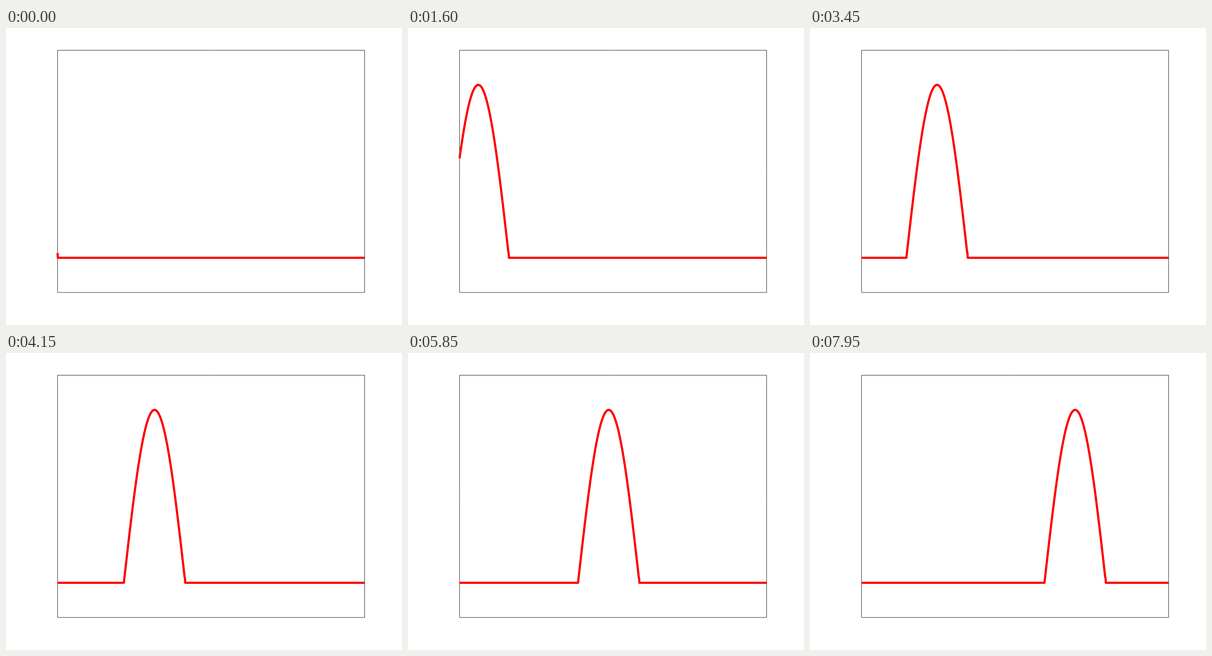
These frames come from a looping animation (864x648 px, 8000 ms). An HTML page with a canvas:

```html
<!DOCTYPE html>
<html lang="en">
<head>
<meta charset="utf-8">
<title>Travelling pulse</title>
<style>
  html, body { margin: 0; width: 100%; height: 100%; overflow: hidden; background: #fff; }
  canvas { display: block; }
</style>
</head>
<body>
<canvas id="stage" width="864" height="648"></canvas>
<script>
const ctx = document.getElementById("stage").getContext("2d");
const LOOP = 8000, STEP = 50;
const LEFT = 112.5, WIDTH = 669.6;
const BASE = 501.4, AMPLITUDE = 377.3;
const CELLS = 1000, CELLS_PER_STEP = 5, PULSE_CELLS = 200;
const FRONT_JUMP = 0.028; // smallest height of the leading sample

// Height of the pulse at a given number of cells behind its front.
function pulse(behind) {
  if (behind <= 0 || behind >= PULSE_CELLS) return 0;
  const height = Math.sin(Math.PI * behind / PULSE_CELLS);
  return behind < PULSE_CELLS / 2 ? Math.max(height, FRONT_JUMP) : height;
}

function draw(time) {
  const front = Math.floor(time / STEP) * CELLS_PER_STEP + 1;
  ctx.fillStyle = "#fff";
  ctx.fillRect(0, 0, 864, 648);

  ctx.strokeStyle = "#262626";
  ctx.lineWidth = 1;
  ctx.strokeRect(112.5, 48.5, 670, 528.5);

  ctx.beginPath();
  for (let cell = 0; cell <= CELLS; cell++) {
    ctx.lineTo(LEFT + WIDTH * cell / CELLS, BASE - AMPLITUDE * pulse(front - cell));
  }
  ctx.strokeStyle = "#f00";
  ctx.lineWidth = 4.8;
  ctx.lineJoin = "round";
  ctx.stroke();
}

const start = performance.now();
function tick() {
  draw((performance.now() - start) % LOOP);
  requestAnimationFrame(tick);
}
tick();
</script>
</body>
</html>
```
